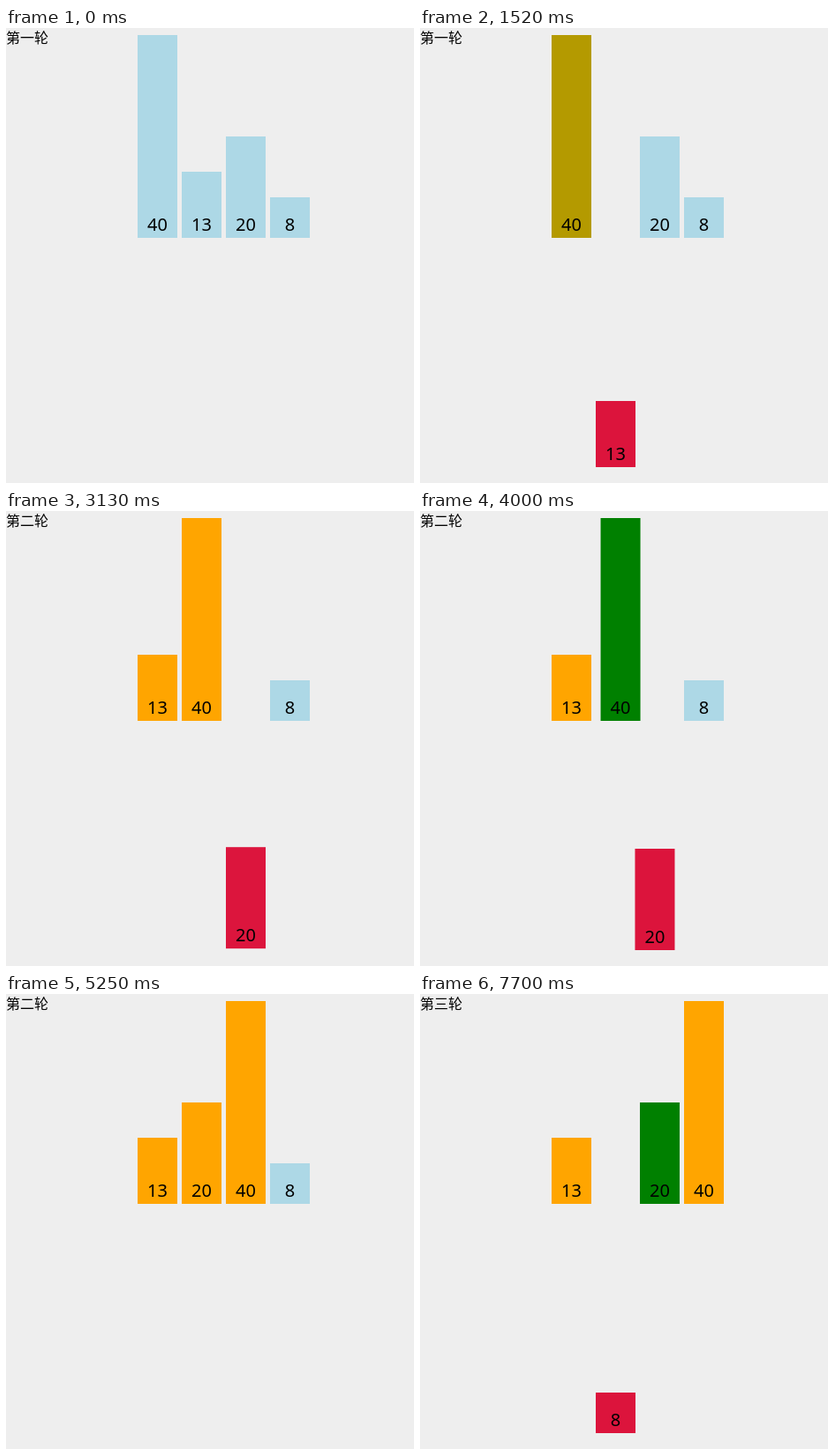
Recreate the animation shown at these times as an HTML page with a canvas. Size 462 by 516 pixels, loop 8 s.

```html
<!DOCTYPE html>
<html lang="zh-CN">
<head>
<meta charset="utf-8">
<title>插入排序</title>
<style>
  html, body { margin: 0; width: 100%; height: 100%; overflow: hidden; background: #eee; }
  canvas { display: block; }
</style>
</head>
<body>
<canvas id="stage" width="462" height="516"></canvas>
<script>
const ctx = document.getElementById('stage').getContext('2d');
const LOOP = 8000, DURATION = 200;
const LEFT = 149, PITCH = 50, BAR = 45, BASE = 238, DROP = 260;

const BLUE = [173, 216, 230], ORANGE = [255, 165, 0];
const RED = [220, 20, 60], GREEN = [0, 128, 0];

const VALUES = [40, 13, 20, 8];
const ROUNDS = [[0, '第一轮'], [2953, '第二轮'], [5475, '第三轮']];

const paint = color => ({ color });
const move = slot => ({ slot });
const lift = { drop: 0, color: ORANGE };
const take = { drop: 1, color: RED };

// Start time and the changes per bar value
const STEPS = [
  [465, { 40: paint(ORANGE) }],
  [970, { 13: take }],
  [1481, { 40: paint(GREEN) }],
  [1965, { 40: move(1), 13: move(0) }],
  [2472, { 13: lift, 40: paint(ORANGE) }],
  [2953, { 20: take }],
  [3470, { 40: paint(GREEN) }],
  [3979, { 40: move(2), 20: move(1) }],
  [4462, { 40: paint(ORANGE), 13: paint(GREEN) }],
  [4985, { 20: lift, 13: paint(ORANGE) }],
  [5475, { 8: take }],
  [5962, { 40: paint(GREEN) }],
  [6465, { 40: move(3), 8: move(2) }],
  [6970, { 40: paint(ORANGE), 20: paint(GREEN) }],
  [7453, { 20: move(2), 8: move(1) }]
];

const bezier = (a, b, u) => 3 * (1 - u) ** 2 * u * a + 3 * (1 - u) * u * u * b + u ** 3;

// Same curve as the CSS keyword "ease"
function ease(p) {
  if (p >= 1) return 1;
  let lo = 0, hi = 1;
  for (let i = 0; i < 24; i++) {
    const mid = (lo + hi) / 2;
    if (bezier(0.25, 0.25, mid) < p) lo = mid; else hi = mid;
  }
  return bezier(0.1, 1, lo);
}

const mix = (a, b, k) =>
  Array.isArray(a) ? a.map((v, i) => mix(v, b[i], k)) : a + (b - a) * k;

function barAt(value, slot, time) {
  const bar = { slot, drop: 0, color: BLUE };
  for (const [start, changes] of STEPS) {
    if (time < start) break;
    const k = ease((time - start) / DURATION);
    for (const [key, goal] of Object.entries(changes[value] || {})) {
      bar[key] = mix(bar[key], goal, k);
    }
  }
  return bar;
}

function drawBar(value, { slot, drop, color }) {
  const x = LEFT + PITCH * slot;
  const bottom = BASE + DROP * drop;
  const height = Math.round(value * 5.75);
  ctx.fillStyle = `rgb(${color.map(Math.round).join(',')})`;
  ctx.fillRect(x, bottom - height, BAR, height);
  ctx.fillStyle = '#000';
  ctx.fillText(value, x + BAR / 2, bottom - 8);
}

function draw(time) {
  ctx.fillStyle = '#eee';
  ctx.fillRect(0, 0, 462, 516);

  ctx.fillStyle = '#000';
  ctx.textAlign = 'left';
  ctx.font = '16px "Noto Sans CJK SC", "Noto Sans CJK", sans-serif';
  ctx.fillText(ROUNDS.filter(([start]) => time >= start).pop()[1], 0, 17);

  ctx.textAlign = 'center';
  ctx.font = '20px "Noto Sans", "Open Sans", sans-serif';
  VALUES.forEach((value, i) => drawBar(value, barAt(value, i, time)));
}

const origin = performance.now();
function tick() {
  draw((performance.now() - origin) % LOOP);
  requestAnimationFrame(tick);
}
tick();
</script>
</body>
</html>
```
